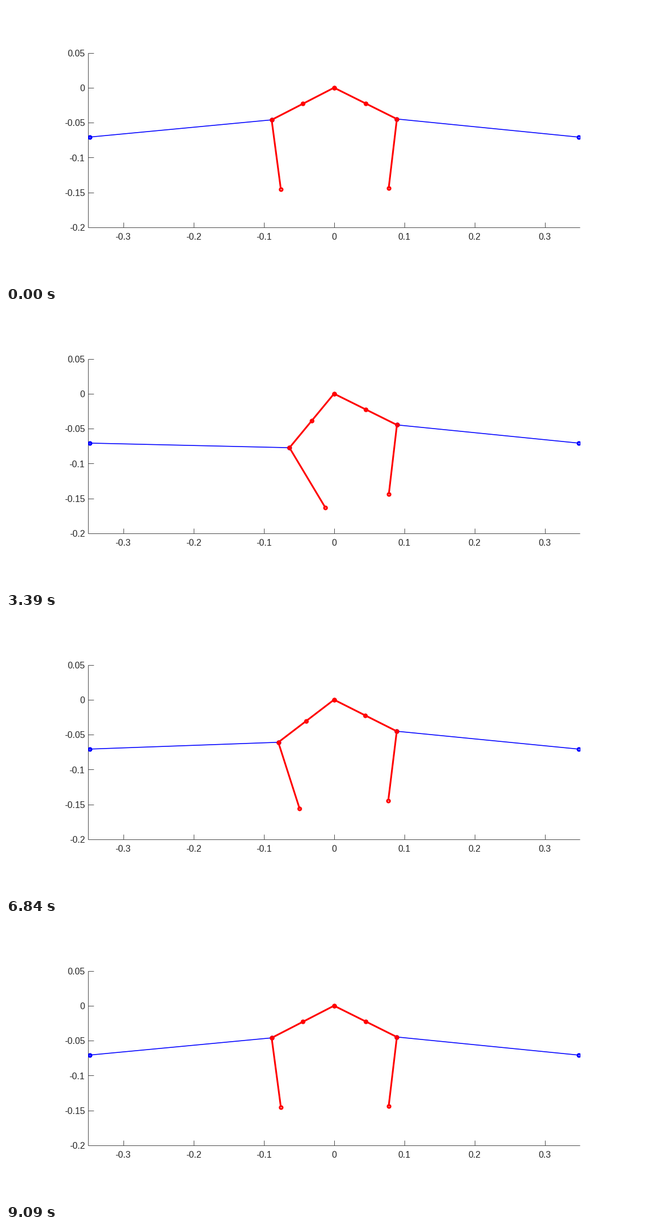
Write a matplotlib script that moves like this. It is 1128 px wide and 496 px high and loops after 9120 ms.

```python
import numpy as np
import matplotlib.pyplot as plt
from matplotlib.animation import FuncAnimation

W, H, DPI = 1128, 496, 100
PX = 72 / DPI
FRAMES, STEP = 304, 30

LEFT, RIGHT, TOP, BOTTOM = 146.0, 1021.3, 83.5, 395.0
XLIM, YLIM = (-0.35, 0.35), (-0.2, 0.05)
LINK = 0.1                # thigh and shank length
KNEE = 19.9               # shank tilt lags the thigh by this angle
ANCHOR = (0.348, -0.0707)

ON, OFF = 64, 218         # actuator switching times
OPEN, CLOSED = 26.6, 52.35
CREEP, TAU_CREEP = 4.5, 50.0
TAU, TAU_LAG = 7.1, 2.15


def page_x(v):
    return LEFT + (v - XLIM[0]) / (XLIM[1] - XLIM[0]) * (RIGHT - LEFT)


def page_y(v):
    return BOTTOM - (v - YLIM[0]) / (YLIM[1] - YLIM[0]) * (BOTTOM - TOP)


def residual(s):
    """Share of a step left after s frames: fast second-order part and slow creep."""
    fast = (TAU * np.exp(-s / TAU) - TAU_LAG * np.exp(-s / TAU_LAG)) / (TAU - TAU_LAG)
    creep = CREEP / (CLOSED - OPEN)
    return (1 - creep) * fast + creep * np.exp(-s / TAU_CREEP)


def angles(i):
    """Thigh angles below the horizontal, in degrees: left, right."""
    span = CLOSED - OPEN
    if ON <= i < OFF:
        s = i - ON
        start = 1 - residual(FRAMES - OFF + ON)
        left = CLOSED - span * start * residual(s)
        right = 26.38 + 0.75 * np.exp(-s / 30) * (1 - np.exp(-s / 4))
    else:
        s = (i - OFF) % FRAMES
        start = 1 - residual(OFF - ON)
        left = OPEN + span * start * residual(s)
        right = 26.45 + 0.48 * np.exp(-s / 80) * (1 - np.exp(-s / 4))
    return left, right


def leg(deg, side):
    """Hip, mid-thigh, knee and foot."""
    a, b = np.radians(deg), np.radians(deg - KNEE)
    kx, ky = LINK * np.cos(a), -LINK * np.sin(a)
    x = np.array([0, kx / 2, kx, kx - LINK * np.sin(b)])
    y = np.array([0, ky / 2, ky, ky - LINK * np.cos(b)])
    return side * x, y


fig = plt.figure(figsize=(W / DPI, H / DPI), dpi=DPI, facecolor="white")
page = fig.add_axes([0, 0, 1, 1], xlim=(0, W), ylim=(H, 0))
page.axis("off")
plot = fig.add_axes([LEFT / W, 1 - BOTTOM / H,
                     (RIGHT - LEFT) / W, (BOTTOM - TOP) / H],
                    xlim=XLIM, ylim=YLIM)
plot.axis("off")

rule = dict(color="#4a4a4a", lw=1 * PX, solid_capstyle="butt")
label = dict(family="Liberation Sans", size=16 * PX, color="#262626",
             va="baseline")

page.plot([LEFT, LEFT], [TOP, BOTTOM], **rule)
page.plot([LEFT, RIGHT], [BOTTOM, BOTTOM], **rule)
for v in (0.05, 0, -0.05, -0.1, -0.15, -0.2):
    y = page_y(v)
    if v > YLIM[0]:
        page.plot([LEFT, LEFT + 9.5], [y, y], **rule)
    page.text(140.3, y + 6.2, f"{v:g}", ha="right", **label)
for v in (-0.3, -0.2, -0.1, 0, 0.1, 0.2, 0.3):
    x = page_x(v)
    page.plot([x, x], [BOTTOM, BOTTOM - 9], **rule)
    page.text(x, 417, f"{v:g}", ha="center", **label)


def make_line(color, width):
    line, = plot.plot([], [], color=color, lw=width * PX, marker="o",
                      ms=5.2 * PX, mew=3.1 * PX, mfc="none", mec=color,
                      solid_capstyle="butt", solid_joinstyle="round")
    return line


cables = [make_line("#0000ff", 1.6) for _ in range(2)]
legs = [make_line("#ff0000", 3.1) for _ in range(2)]


def draw(i):
    for deg, side, cable, limb in zip(angles(i), (-1, 1), cables, legs):
        x, y = leg(deg, side)
        limb.set_data(x, y)
        cable.set_data([x[2], side * ANCHOR[0]], [y[2], ANCHOR[1]])
    return cables + legs


anim = FuncAnimation(fig, draw, frames=FRAMES, interval=STEP,
                     repeat=True, repeat_delay=0, blit=False)
plt.show()
```
